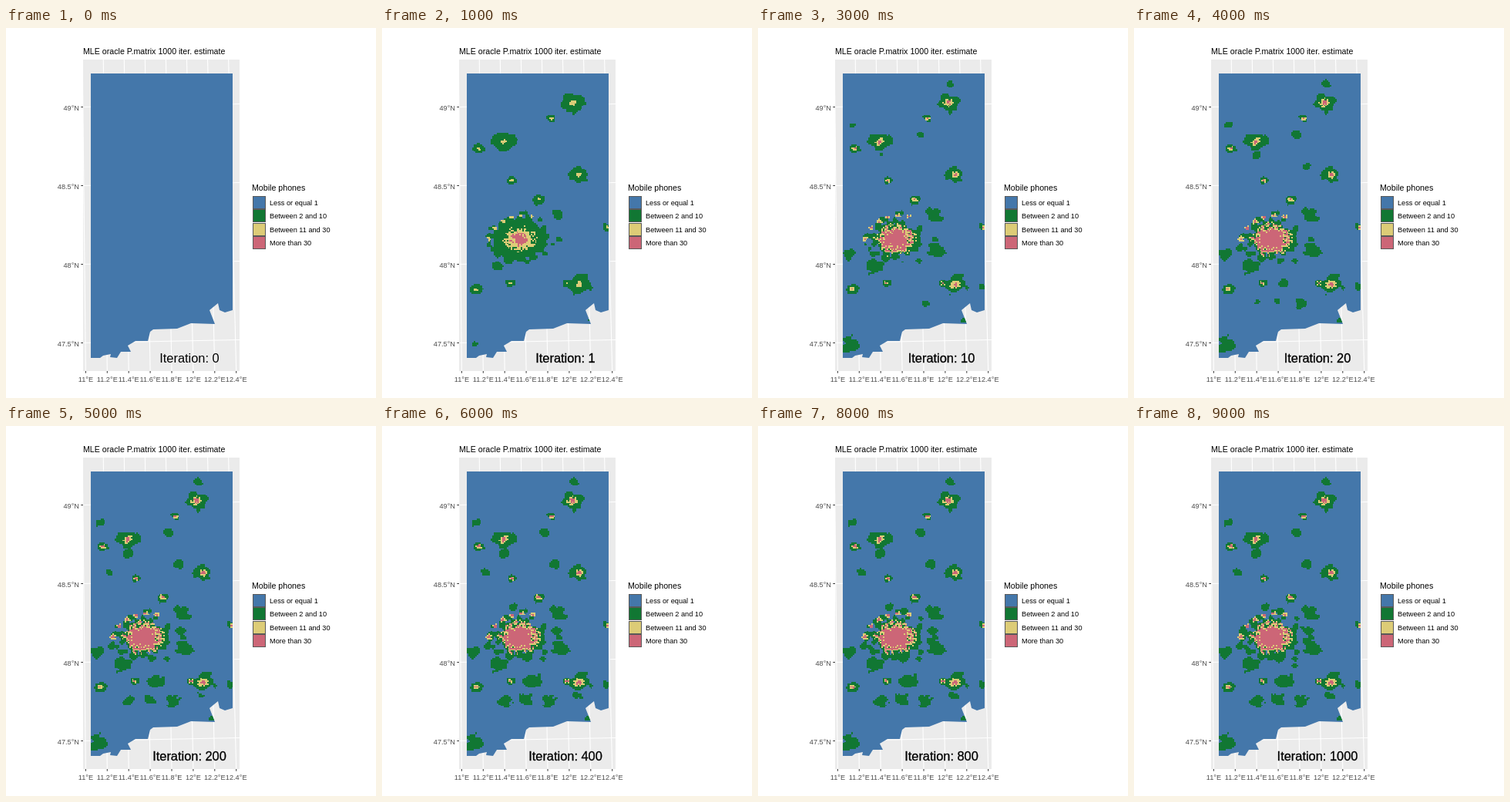
An HTML page with a canvas for the animation above (10000 ms loop, 480 px wide and 480 px high).

```html
<!DOCTYPE html>
<html lang="en">
<head>
<meta charset="utf-8">
<title>Mobile phone density estimate</title>
<style>
html, body { margin: 0; width: 100%; height: 100%; overflow: hidden; background: #fff; }
svg, canvas { position: absolute; left: 0; top: 0; width: 480px; height: 480px; }
text { font: 9.2px "Liberation Sans", Arial, sans-serif; }
.head { font-size: 10.65px; }
.axis { fill: #4d4d4d; }
#label { font-size: 16.4px; text-anchor: middle; stroke-width: 0.3px; }
</style>
</head>
<body>
<svg id="plot" viewBox="0 0 480 480">
  <clipPath id="panel"><rect x="100" y="41" width="203" height="404"/></clipPath>
  <rect x="100" y="41" width="203" height="404" fill="#ebebeb"/>
  <g id="grid" clip-path="url(#panel)" stroke="#fff" stroke-width="1.1"></g>
  <g id="ticks" stroke="#333"></g>
  <text class="head" x="100" y="34">MLE oracle P.matrix 1000 iter. estimate</text>
  <text class="head" x="319" y="211">Mobile phones</text>
  <text id="label" x="238" y="434"></text>
</svg>
<canvas id="map" width="480" height="480"></canvas>
<script>
const COLORS = ['#4477aa', '#117733', '#ddcc77', '#cc6677'];
const CLASSES = ['Less or equal 1', 'Between 2 and 10', 'Between 11 and 30', 'More than 30'];
const ITERATIONS = [0, 1, 5, 10, 20, 200, 400, 600, 800, 1000];
const GREEN = 1, YELLOW = 2, RED = 3;
const CELL = 1.845, LEFT = 110, TOP = 59, RIGHT = 294;

const plot = document.getElementById('plot');
const label = document.getElementById('label');
const ctx = document.getElementById('map').getContext('2d');

function add(parent, tag, attrs, text = '') {
  const el = document.createElementNS('http://www.w3.org/2000/svg', tag);
  for (const key in attrs) el.setAttribute(key, attrs[key]);
  el.textContent = text;
  parent.append(el);
}
const line = (id, x1, y1, x2, y2) =>
  add(document.getElementById(id), 'line', { x1, y1, x2, y2 });

for (let i = 0; i < 4; i++) {
  const y = 102.5 + i * 102;
  line('grid', 100, y, 303, y - 4);
  line('ticks', 97.3, y, 100, y);
  add(plot, 'text', { class: 'axis', x: 95, y: y + 4, 'text-anchor': 'end' }, `${49 - i / 2}°N`);
}
for (let i = 0; i < 8; i++) {
  const x = 103.4 + i * 27.9;
  line('grid', x, 445, x - (x + 37) * 0.03, 41);
  line('ticks', x, 445, x, 447.7);
  add(plot, 'text', { class: 'axis', x, y: 459, 'text-anchor': 'middle' }, `${+(11 + i / 5).toFixed(1)}°E`);
}
CLASSES.forEach((name, i) => {
  const y = 218 + i * 17.28;
  add(plot, 'rect', {
    x: 320.5, y: Math.round(y) + 0.5, width: 16, height: 16,
    fill: COLORS[i], stroke: '#595959'
  });
  add(plot, 'text', { x: 342, y: y + 12.1 }, name);
});

// Key places: [x, y, radius].
const towns = [
  [247, 97, 15], [220, 117, 5], [158, 148, 14], [126, 156, 7], [168, 198, 6],
  [256, 190, 11], [203, 222, 8], [256, 333, 14], [240, 331, 6], [292, 259, 6],
  [122, 339, 7], [166, 331, 6]
];
// Rural patches, in the order in which they emerge.
const patches = [
  [228, 242, 11], [150, 309, 11], [268, 379, 4], [120, 410, 11], [231, 289, 11],
  [118, 294, 8], [291, 337, 6], [249, 72, 6], [211, 139, 7], [122, 126, 6],
  [217, 357, 9], [160, 165, 7], [224, 180, 7], [196, 331, 11], [186, 354, 9],
  [160, 356, 9], [134, 190, 5], [254, 350, 6], [188, 299, 9]
];
const city = { x: 178, y: 274 };

const hash = (x, y) => {
  const v = Math.sin(x * 127.1 + y * 311.7) * 43758.5453;
  return v - Math.floor(v);
};
const mix = (a, b, t) => a + (b - a) * t * t * (3 - 2 * t);
function smooth(x, y) {
  const i = Math.floor(x), j = Math.floor(y);
  return mix(mix(hash(i, j), hash(i + 1, j), x - i),
             mix(hash(i, j + 1), hash(i + 1, j + 1), x - i), y - j);
}

// Fills the grid cells of an ellipse whose rim is broken up by noise.
function paint(level, x, y, radius, rough, aspect = 0.82) {
  ctx.fillStyle = COLORS[level];
  const reach = Math.ceil(radius * (1 + rough / 2) / CELL);
  const col = Math.floor((x - LEFT) / CELL), row = Math.floor((y - TOP) / CELL);
  for (let r = row - reach; r <= row + reach; r++) {
    for (let c = col - reach; c <= col + reach; c++) {
      const px = LEFT + c * CELL, py = TOP + r * CELL;
      const lumps = smooth(c / 3, r / 3);
      const noise = level === GREEN ? lumps : (lumps + 2 * hash(c, r + level)) / 3;
      const distance = Math.hypot(px + CELL / 2 - x, (py + CELL / 2 - y) / aspect);
      if (distance > radius * (1 + (noise - 0.5) * rough)) continue;
      const x0 = Math.round(px), y0 = Math.round(py);
      ctx.fillRect(x0, y0, Math.round(px + CELL) - x0, Math.round(py + CELL) - y0);
    }
  }
}

// Southern border, from west to east.
const border = [
  [110, 428], [122, 428], [126, 425], [136, 423], [135, 427], [144, 428], [149, 420],
  [162, 420], [158, 412], [168, 406], [184, 406], [187, 394], [191, 391], [222, 390],
  [240, 383], [271, 384], [264, 366], [275, 357], [277, 366], [284, 369], [294, 366]
];
const land = new Path2D();
land.moveTo(RIGHT, TOP);
land.lineTo(LEFT, TOP);
for (const [x, y] of border) land.lineTo(x, y);
land.closePath();

function drawGreen(stage) {
  const rough = stage === 1 ? 0.5 : 0.8;
  paint(GREEN, city.x, city.y, stage === 1 ? 40 : 33, rough, 0.75);
  for (const [x, y, r] of towns) paint(GREEN, x, y, stage === 1 ? r * 1.1 : r, rough);
  patches.forEach(([x, y, r], i) => {
    const growth = Math.min(1, (stage - i / 4) / 2);
    if (growth > 0) paint(GREEN, x, y, r * Math.sqrt(growth), rough, 0.85);
  });
  // Small settlements scattered around the city.
  for (let i = 0; i < stage * 3; i++) {
    const angle = i * 2.4, far = 34 + 28 * hash(i, 5);
    paint(GREEN, city.x + far * Math.cos(angle), city.y + far * 0.7 * Math.sin(angle), 3 + 4 * hash(i, 9), 0.9);
  }
}

function drawDense(stage) {
  const growth = 1 - Math.exp(-(stage - 1) / 1.5);
  const places = towns.map(([x, y, r]) => [x, y, 1 + r * mix(0.2, 0.33, growth)]);
  // Suburbs along an arc north-west of the city.
  for (let i = 0; i < 6; i++) {
    const angle = Math.PI + i * 0.42, far = 30 + (i - 3) ** 2;
    places.push([city.x + far * Math.cos(angle), city.y + far * Math.sin(angle), 2.5 + growth]);
  }
  for (const [x, y, r] of places) paint(YELLOW, x, y, r, 1.1);
  paint(YELLOW, city.x, city.y, mix(17, 22, growth), 0.9);
  if (stage > 1) for (const [x, y, r] of places) paint(RED, x, y, r * growth * 0.6, 1.3);
  paint(RED, city.x, city.y, mix(8, 18, growth), 1.3, 0.88);
}

function draw(stage) {
  label.textContent = 'Iteration: ' + ITERATIONS[stage];
  label.setAttribute('stroke', stage ? '#000' : 'none');
  ctx.clearRect(0, 0, 480, 480);
  ctx.save();
  ctx.clip(land);
  ctx.fillStyle = COLORS[0];
  ctx.fillRect(LEFT, TOP, RIGHT - LEFT, 370);
  if (stage) {
    drawGreen(stage);
    drawDense(stage);
  }
  ctx.restore();
}

let shown = -1;
function tick() {
  const stage = Math.floor(performance.now() / 1000) % ITERATIONS.length;
  if (stage !== shown) draw(shown = stage);
  requestAnimationFrame(tick);
}
tick();
</script>
</body>
</html>
```
